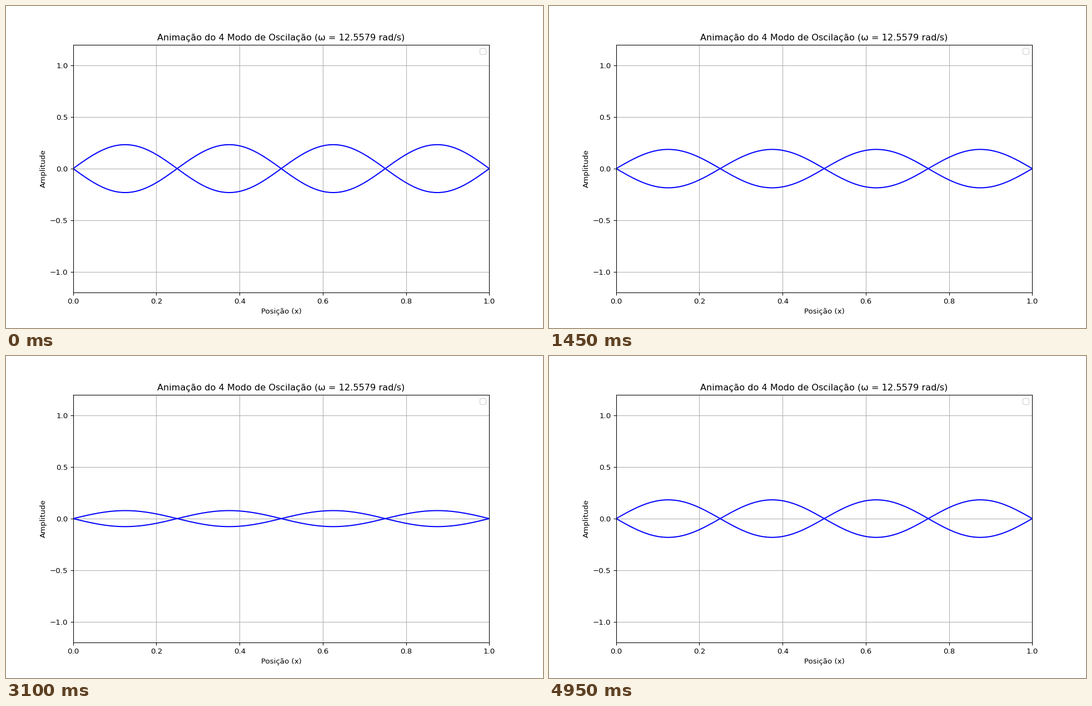
Write a matplotlib script that moves like this. It is 966 px wide and 580 px high and loops after 5 s.

```python
import numpy as np
import matplotlib.pyplot as plt
from matplotlib.animation import FuncAnimation

WIDTH, HEIGHT, DPI = 966, 580, 96.6
FRAMES, INTERVAL = 100, 50
MODE, OMEGA, AMPLITUDE = 4, 12.5579, 0.232

plt.rcParams["font.family"] = "DejaVu Sans"

# The small margin keeps the pixel size from being truncated downwards.
fig, ax = plt.subplots(
    figsize=((WIDTH + 1e-3) / DPI, (HEIGHT + 1e-3) / DPI), dpi=DPI
)
ax.set_xlim(0, 1)
ax.set_ylim(-1.2, 1.2)
ax.set_title(f"Animação do {MODE} Modo de Oscilação (ω = {OMEGA:.4f} rad/s)")
ax.set_xlabel("Posição (x)")
ax.set_ylabel("Amplitude")
ax.grid(True)
ax.legend([], [], loc="upper right")

x = np.linspace(0, 1, 100)
shape = AMPLITUDE * np.sin(MODE * np.pi * x)
upper, = ax.plot(x, shape, color="blue", lw=1.5)
lower, = ax.plot(x, -shape, color="blue", lw=1.5)


def update(frame):
    t = frame * INTERVAL / 1000
    y = shape * np.cos(OMEGA * t)
    upper.set_ydata(y)
    lower.set_ydata(-y)
    return upper, lower


anim = FuncAnimation(fig, update, frames=FRAMES, interval=INTERVAL,
                     repeat=True, repeat_delay=0, blit=False)
plt.show()
```
